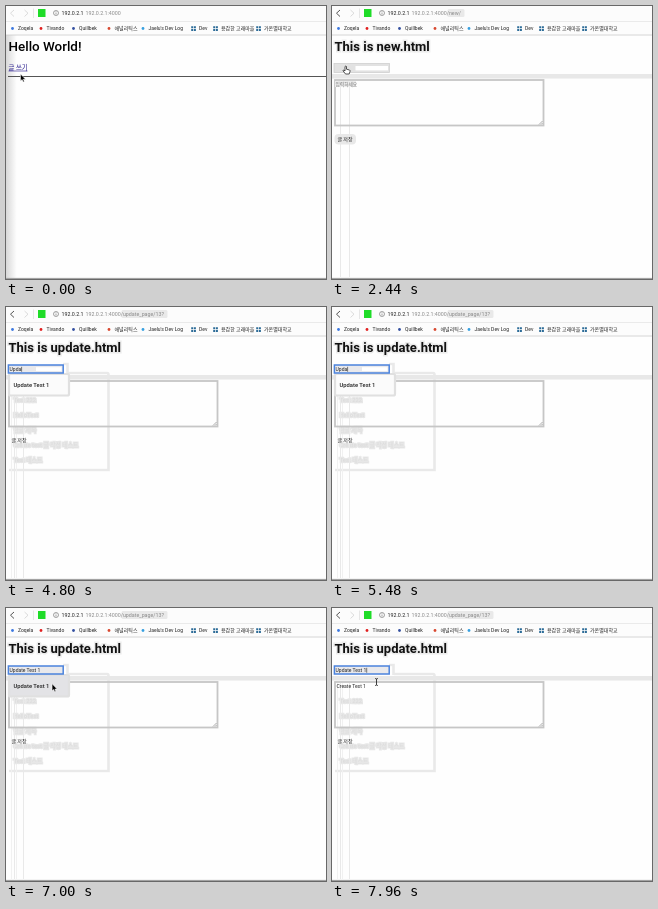
An HTML page that plays this animation: 320x273 px, repeating every 8000 ms.

```html
<!DOCTYPE html>
<html>
<head>
<meta charset="utf-8">
<style>
html, body { margin: 0; width: 100%; height: 100%; overflow: hidden; background: #fff; }
svg { display: block; width: 100vw; height: 100vh; }
text { font: 5px Roboto, "Noto Sans CJK KR", "Noto Sans CJK", sans-serif; fill: #222; white-space: pre; }
.title { font-size: 13.4px; font-weight: 500; fill: #000; }
.heavy { font-size: 13px; font-weight: 700; fill: #111; stroke: #ececec; stroke-width: 3; paint-order: stroke; }
.item { font-size: 5.8px; font-weight: 500; }
.address { font-size: 5.3px; }
.dim { fill: #888; }
.ghost text { fill: #dcdcdc; stroke: #e7e7e7; stroke-width: 2.4; paint-order: stroke; }
</style>
</head>
<body>
<svg viewBox="0 0 320 273" preserveAspectRatio="none">
  <defs>
    <linearGradient id="shade">
      <stop stop-color="#d8d8d8"/><stop offset="1" stop-color="#fff"/>
    </linearGradient>
  </defs>
  <rect width="320" height="273" fill="#fefefe"/>

  <rect id="shadow" y="29" width="11" height="243" fill="url(#shade)"/>

  <g id="home">
    <text class="title" x="2.5" y="45">Hello World!</text>
    <text x="2.5" y="63.7" style="font-size:6.4px;fill:#22168a">글 쓰기</text>
    <path d="M2.5 65H21.5" stroke="#22168a" stroke-width=".6"/>
    <path d="M2 70.5H320" stroke="#555"/>
  </g>

  <g id="trace" class="ghost">
    <path d="M62 66H101Q102.500 66 102.500 68V163H3M57 57h4.500v10" fill="none" stroke="#e9e9e9" stroke-width="2.600"/>
    <path d="M5.500 75V271M10.500 75V271" stroke="#f1f1f1"/>
  </g>

  <g id="form">
    <path d="M0 70.300H320" stroke="#e8e8e8" stroke-width="4.500"/>
    <path d="M8.500 75V271M17.500 75V271" stroke="#e9e9e9"/>
    <text id="heading" class="title heavy" x="2.5" y="45"></text>
    <g id="blank">
      <rect x="2" y="57.5" width="55.5" height="9" fill="#e2e2e2" stroke="#d0d0d0" stroke-width=".8"/>
      <rect x="23.5" y="60" width="32.5" height="4.4" fill="#fff"/>
    </g>
    <rect x="3" y="74" width="208.5" height="45.5" fill="none" stroke="#c6c6c6" stroke-width="1.8"/>
    <path d="M207 118.5l3.5-3.5M209 118.5l1.5-1.5" stroke="#777" stroke-width=".6"/>
    <g id="hint">
      <rect x="3" y="75" width="21" height="6" fill="#ececec"/>
      <text x="3.5" y="80" style="font-size:4.7px;fill:#777">입력하세요</text>
      <rect x="2.5" y="128" width="21.5" height="10.5" rx="4" fill="#e8e8e8"/>
    </g>
    <text id="body" x="4.5" y="79.8">Create Test 1</text>
    <text x="5.5" y="135.2">글 저장</text>
  </g>

  <g id="edit">
    <g id="list"></g>
    <rect x="2.4" y="58" width="54.8" height="8" fill="#e9e9ec" stroke="#4b83dd" stroke-width="1.5"/>
    <rect id="clear" x="30" y="60.200" width="25.500" height="3.800" fill="#fff"/>
    <rect id="selection" x="3.500" y="59.500" height="5.200" fill="#9dc1f5"/>
    <text id="field" x="3.6" y="63.9"></text>
    <path id="caret" stroke="#222" stroke-width=".6"/>
  </g>

  <rect width="320" height="29" fill="#fcfcfc"/>
  <path d="M0 15.500H320" stroke="#e2e2e2" stroke-width=".7"/>
  <path d="M0 29H320" stroke="#c9c9c9" stroke-width=".8"/>
  <path id="back" d="M8 4L4.500 7.200L8 10.500" fill="none"/>
  <path d="M18.500 4L22 7.200L18.500 10.500" fill="none" stroke="#d2d2d2" stroke-width=".8"/>
  <path d="M27.500 2.500V12" stroke="#ddd" stroke-width=".7"/>
  <rect x="32" y="3" width="7.500" height="8" fill="#1fdc28"/>
  <circle cx="50" cy="7" r="2.500" fill="none" stroke="#666" stroke-width=".6"/>
  <path d="M50 6.500V8.500M50 5.300V5.900" stroke="#666" stroke-width=".6"/>
  <rect id="pathGlow" x="115.500" y="3" height="8" rx="1.500" fill="#e9e9e9"/>
  <text class="address" x="55.500" y="8.800">192.0.2.1</text>
  <text class="address dim" x="79.500" y="8.800">192.0.2.1:4000<tspan id="path"></tspan></text>
  <g id="bookmarks"></g>
  <path d="M0 272.400H320" stroke="#999" stroke-width="1"/>

  <g id="pointer">
    <path id="arrow" d="M0 0V7L1.600 5.600L2.700 8L3.800 7.500L2.800 5.200H5Z" fill="#000" stroke="#fff" stroke-width=".5"/>
    <path id="hand" d="M-1-3.500q.8-.8 1.500 0V-.8l3 .8q.8.400.5 1.500L3.200 4H-.5L-3 .8q0-1 1-.6l1 .8Z" fill="#fff" stroke="#111" stroke-width=".7"/>
    <path id="beam" d="M-1.300-3.500Q0-3.500 0-2.500Q0-3.500 1.300-3.500M0-2.500V2.500M-1.300 3.500Q0 3.500 0 2.500Q0 3.500 1.300 3.500" fill="none" stroke="#111" stroke-width=".8"/>
  </g>
</svg>
<script>
const LOOP = 8000, OPEN_NEW = 1760, OPEN_EDIT = 3720;
const $ = id => document.getElementById(id);
const show = (id, on) => $(id).style.display = on ? '' : 'none';
const set = (id, attrs) => { for (const k in attrs) $(id).setAttribute(k, attrs[k]); };

const bookmarks = [
  [6.5, '#3c78e0', 'Zoqela'], [35, '#e02020', 'Tivando'], [67.5, '#3450a0', 'Quillbek'],
  [103, '#d84830', '애널리틱스'], [137, '#38a0e0', "Jaelu's Dev Log"],
  [187.5, 'grid', 'Dev'], [209.5, 'grid', '용감한 고래마을'], [252.5, 'grid', '가온별대학교']
];
$('bookmarks').innerHTML = bookmarks.map(([x, color, name]) => {
  const icon = color === 'grid'
    ? `<path d="M${x - 2.3} 20.200h2v2h-2zm2.700 0h2v2h-2zm-2.700 2.700h2v2h-2zm2.700 0h2v2h-2z" fill="#2d6c98"/>`
    : `<circle cx="${x}" cy="22.500" r="1.400" fill="${color}"/>`;
  return `${icon}<text x="${x + 5.5}" y="24.300">${name}</text>`;
}).join('');

const choices = ['Update Test 1', 'Test 222', 'HelloTest', '한글 제목', 'Create test 글 작성 테스트', 'Test 테스트'];
const rows = (from, to) => choices.slice(from, to).map((s, i) =>
  `<text class="item" x="7.500" y="${80 + (from + i) * 14.9}">${s}</text>`).join('');
$('trace').innerHTML += rows(1, 6);

// time, field text, open rows, state
const typing = [
  [OPEN_EDIT, 'Create Test 1', 0, ''], [4160, '', 6, ''], [4400, 'U', 1, ''],
  [4520, 'Up', 1, ''], [4640, 'Upd', 1, ''], [4760, 'Upda', 1, ''],
  [6160, 'Upda', 1, 'selected'], [6960, 'Update Test 1', 1, 'picked'], [7520, 'Update Test 1', 0, '']
];
// time, x, y, shape
const moves = [
  [0, 14.5, 68, 'arrow'], [40, 14.5, 68, 'arrow'], [500, 14, 64, 'hand'],
  [2560, 14, 64, 'hand'], [3000, 34, 50, 'arrow'], [3360, 42, 44, 'beam'],
  [3520, 29.3, 66.5, 'beam'], [4160, 29.3, 66.5, ''], [6600, 60, 92, 'arrow'],
  [7100, 44.5, 74, 'beam'], [LOOP, 44.5, 74, 'beam']
];
const last = (table, t) => table.findLastIndex(row => row[0] <= t);

function drawPointer(t) {
  const i = last(moves, t), [t0, x0, y0, shape] = moves[i];
  const [t1, x1, y1] = moves[i + 1] || moves[i];
  const k = t1 > t0 ? (t - t0) / (t1 - t0) : 0, e = k * k * (3 - 2 * k);
  set('pointer', { transform: `translate(${x0 + (x1 - x0) * e} ${y0 + (y1 - y0) * e})` });
  for (const id of ['arrow', 'hand', 'beam']) show(id, id === shape);
}

function dropdown(count, picked) {
  if (!count) return '';
  const w = count > 1 ? 100 : 60, h = count > 1 ? 97 : 21.5;
  return `<rect x="3" y="67" width="${w}" height="${h}" rx="1.500" fill="${picked ? '#e3e3e6' : '#fbfbfb'}" stroke="#e0e0e0" stroke-width="2.200"/>` + rows(0, count);
}

function drawField(t) {
  const [, value, count, state] = typing[Math.max(0, last(typing, t))];
  $('field').textContent = value;
  $('list').innerHTML = dropdown(count, state === 'picked');
  const w = value && t >= OPEN_EDIT ? $('field').getComputedTextLength() : 0;
  show('trace', t >= 4400);
  show('body', t >= OPEN_EDIT && !count);
  show('clear', value.length < 5);
  show('selection', state === 'selected');
  set('selection', { width: w });
  show('caret', !state && (t < 5000 || t >= 7520 || t % 1000 < 500));
  set('caret', { d: `M${4 + w} 59.800V64.700` });
}

function draw(t) {
  const edit = t >= OPEN_EDIT, opened = t >= OPEN_NEW;
  show('home', !opened);
  show('form', opened);
  show('edit', edit);
  show('blank', !edit);
  show('hint', !edit);
  show('pathGlow', opened);
  set('shadow', { opacity: Math.max(0, 1 - Math.max(0, t - 40) / 400) });
  set('back', { stroke: opened ? '#555' : '#d2d2d2', 'stroke-width': opened ? 1 : .8 });
  set('pathGlow', { width: edit ? 46 : 17 });
  $('path').textContent = edit ? '/update_page/13?' : opened ? '/new/' : '';
  $('heading').textContent = edit ? 'This is update.html' : 'This is new.html';
  drawField(t);
  drawPointer(t);
}

const start = performance.now();
function tick() {
  draw((performance.now() - start) % LOOP);
  requestAnimationFrame(tick);
}
tick();
</script>
</body>
</html>
```
